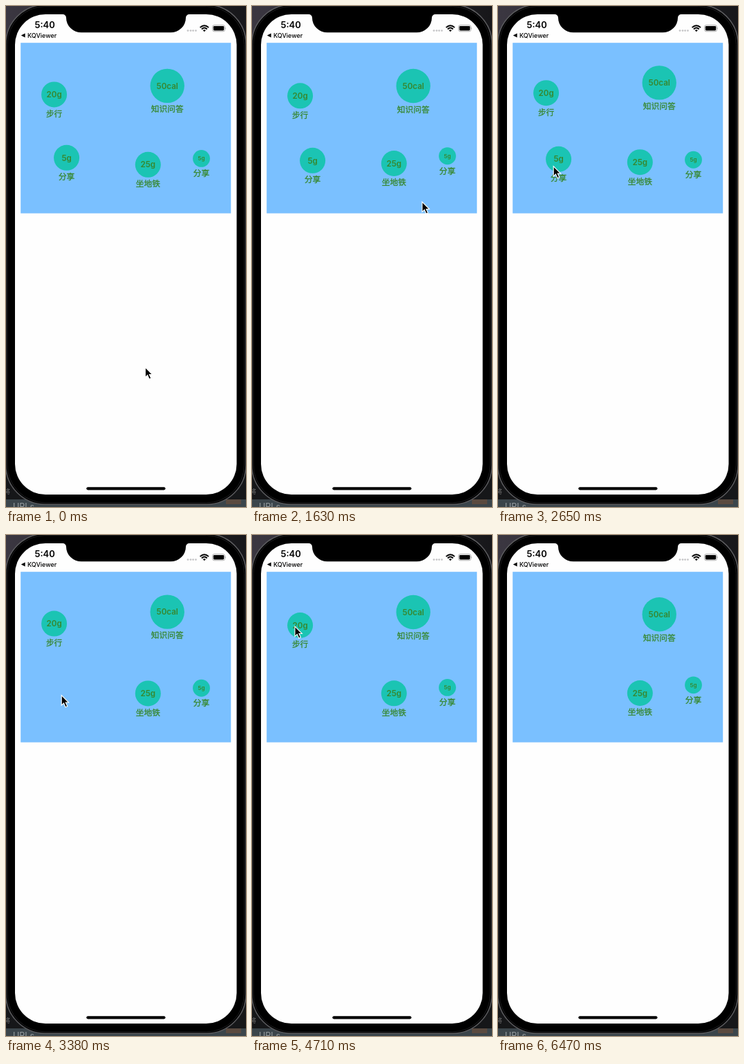
These frames come from a looping animation (347 px wide and 724 px high, 6570 ms). An HTML page:

```html
<!DOCTYPE html>
<html lang="zh-CN">
<head>
<meta charset="utf-8">
<title>Floating bubbles</title>
<style>
  html, body { margin: 0; width: 100%; height: 100%; overflow: hidden; background: #000; }
  svg { display: block; width: 347px; height: 724px; }
  text { font-family: Inter, "Noto Sans CJK SC", "Noto Sans CJK", "Noto Sans", sans-serif; }
  .bubble circle { fill: #1bc4b3; }
  .bubble text { fill: #37882f; text-anchor: middle; }
  .bubble .value { font-weight: 600; }
  .bubble .label { font-weight: 500; stroke: #37882f; stroke-width: .3px; }
</style>
</head>
<body>
<svg viewBox="0 0 347 724">
  <defs>
    <linearGradient id="desk">
      <stop offset="0" stop-color="#3b3741"/>
      <stop offset="1" stop-color="#17171a"/>
    </linearGradient>
  </defs>

  <!-- desktop behind the phone -->
  <rect width="347" height="724" fill="url(#desk)"/>
  <rect y="600" width="347" height="124" fill="#161719"/>
  <rect y="713" width="347" height="11" fill="#3b454b"/>
  <rect x="318" y="713" width="22" height="7" fill="#5a4a40"/>
  <text x="-3" y="705" font-size="9" fill="#777">将</text>
  <text x="10" y="728" font-size="12.5" fill="#959c9f">URLs</text>

  <!-- phone -->
  <rect x="-.3" y="-1.8" width="347.3" height="722" rx="57" fill="#000" stroke="#5a5a5d" stroke-width="1.6"/>
  <rect x="2" y=".5" width="342.5" height="717.5" rx="55" fill="#000" stroke="#1d1d1f"/>
  <rect x="13" y="12" width="320.5" height="694" rx="44" fill="#fefefe"/>
  <path d="M82 11.5V12A5 5 0 0 1 87 17A22 21.3 0 0 0 109 38.3H238A22 21.3 0 0 0 260 17A5 5 0 0 1 265 12V11.5Z"/>
  <rect x="116.3" y="695.2" width="114.2" height="4.2" rx="2.1"/>

  <!-- status bar -->
  <text x="41.5" y="31.6" font-size="13" font-weight="600">5:40</text>
  <path d="M21.8 42.6L27.6 39.6V45.6Z"/>
  <text x="31" y="46" font-size="9" font-weight="500">KQViewer</text>
  <g fill="#c5c5c7">
    <circle cx="263" cy="35.6" r="1.4"/><circle cx="267" cy="35.6" r="1.4"/>
    <circle cx="270.6" cy="35.6" r="1.4"/><circle cx="274.4" cy="35.6" r="1.4"/>
  </g>
  <g fill="none" stroke="#000" stroke-width="1.9">
    <path d="M280.6 31.1Q286.8 25.2 293 31.1"/>
    <path d="M282.9 33.5Q286.8 29.7 290.7 33.5"/>
  </g>
  <path d="M284.7 35.1Q286.8 33.3 288.9 35.1L286.8 37.2Z"/>
  <rect x="298.5" y="27.6" width="18" height="9.2" rx="2.6" fill="none" stroke="#a5a5a5" stroke-width=".9"/>
  <rect x="299.8" y="28.9" width="15.4" height="6.6" rx="1.4"/>
  <path d="M317.5 30.7Q319 32.2 317.5 33.7Z" fill="#a5a5a5"/>

  <rect x="21.2" y="53.2" width="304" height="246.4" fill="#7ac0ff"/>
  <g id="bubbles"></g>
  <path id="cursor" d="M0 0V14.6L3.3 11.5L5.8 17.2L8.5 16L6 10.5H10.4Z" stroke="#fff" stroke-width="1.1"/>
</svg>
<script>
const LOOP = 6570, STEP = 147.05;
const NS = 'http://www.w3.org/2000/svg';

// y: middle height, period and peak: timing of the bobbing, end: time it is collected
const bubbles = [
  { x: 69.6,  y: 128.9, r: 18.5, value: '20g',   label: '步行',     amp: 3.3, period: 3200, peak: 960,  end: 4860 },
  { x: 233.2, y: 113.1, r: 24.7, value: '50cal', label: '知识问答', amp: 3.2, period: 2130, peak: 1860 },
  { x: 87.6,  y: 222.5, r: 18.5, value: '5g',    label: '分享',     amp: 3.3, period: 2130, peak: 1175, end: 2940 },
  { x: 205.3, y: 228.3, r: 18.5, value: '25g',   label: '坐地铁',   amp: 3.3, period: 3300, peak: 665 },
  { x: 282.5, y: 219.7, r: 12.4, value: '5g',    label: '分享',     amp: 3.0, period: 2350, peak: 500, size: 8 }
];

// time, x, y of the pointer tip
const path = [
  [0, 201.3, 522], [1030, 201.3, 522], [1176, 212, 427], [1617, 246, 283], [1910, 240, 276],
  [2500, 82, 232], [2646, 80.2, 231.5], [3235, 80.2, 231.5], [3970, 220, 227.5], [4117, 220, 227.5],
  [4705, 62, 132], [4850, 51, 132], [5000, 60, 150], [5440, 202.3, 391.7], [5735, 299, 560], [5882, 286, 712]
];
const cursorEnd = 5950;

function add(parent, tag, attrs, text = '') {
  const el = document.createElementNS(NS, tag);
  for (const key in attrs) el.setAttribute(key, attrs[key]);
  el.textContent = text;
  return parent.appendChild(el);
}

const layer = document.getElementById('bubbles');
for (const b of bubbles) {
  const size = b.size || 11.6;
  b.el = add(layer, 'g', { class: 'bubble' });
  add(b.el, 'circle', { r: b.r });
  add(b.el, 'text', { class: 'value', y: size * 0.36, 'font-size': size }, b.value);
  add(b.el, 'text', { class: 'label', y: b.r + 13.4, 'font-size': 11.7 }, b.label);
}

const cursor = document.getElementById('cursor');
const show = (el, on) => el.setAttribute('visibility', on ? 'visible' : 'hidden');
const move = (el, x, y) => el.setAttribute('transform', `translate(${x.toFixed(2)} ${y.toFixed(2)})`);

function pointAt(t) {
  const i = path.findIndex(p => p[0] > t);
  if (i < 0) return path[path.length - 1].slice(1);
  const [t0, x0, y0] = path[i - 1], [t1, x1, y1] = path[i];
  const k = (t - t0) / (t1 - t0);
  return [x0 + (x1 - x0) * k, y0 + (y1 - y0) * k];
}

function draw(now) {
  const t = Math.floor((now % LOOP) / STEP) * STEP;
  for (const b of bubbles) {
    move(b.el, b.x, b.y + b.amp * Math.cos(2 * Math.PI * (t - b.peak) / b.period));
    show(b.el, !b.end || t < b.end);
  }
  move(cursor, ...pointAt(t));
  show(cursor, t < cursorEnd);
}

const start = performance.now();
function tick() {
  draw(performance.now() - start);
  requestAnimationFrame(tick);
}
tick();
</script>
</body>
</html>
```
